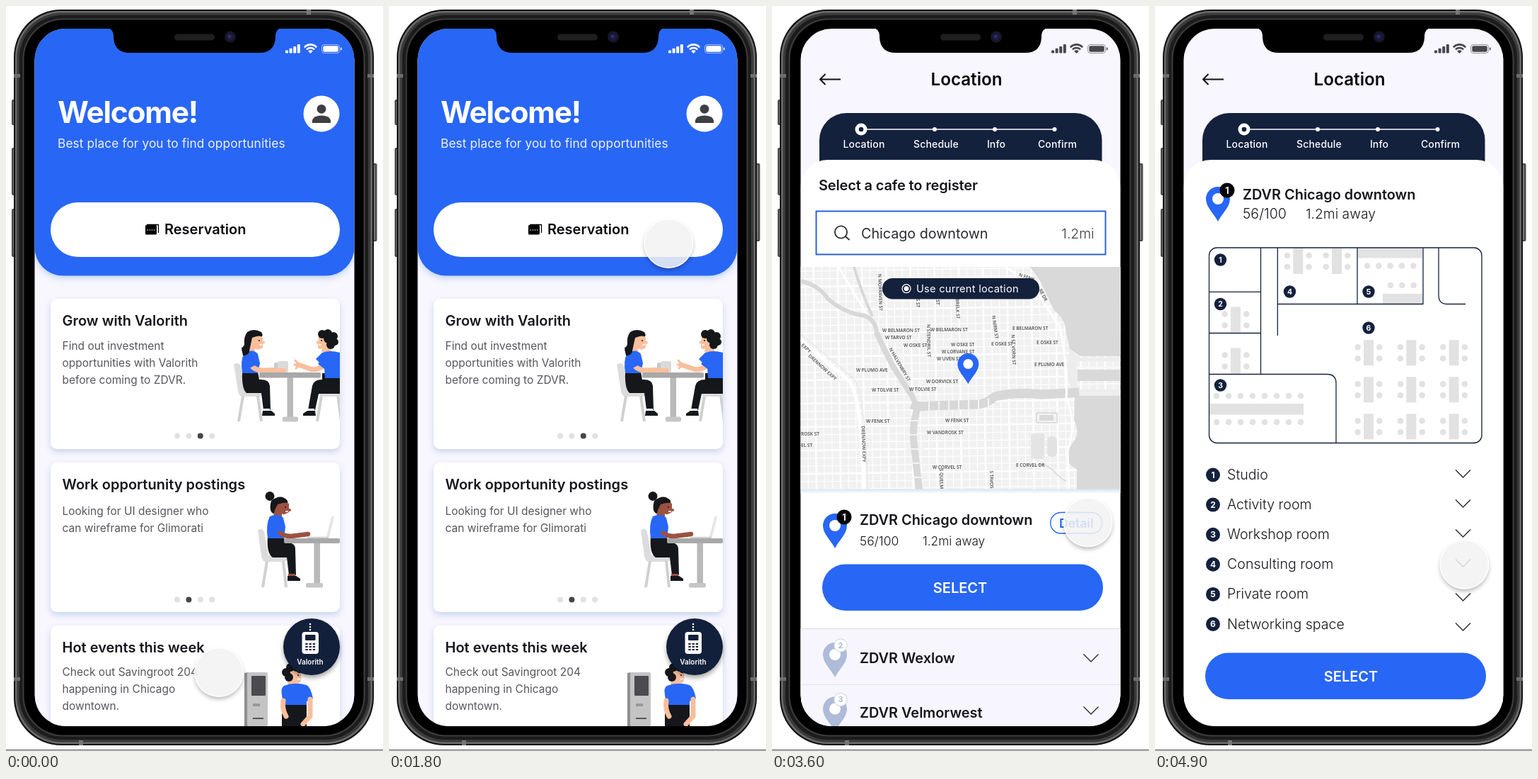
Animation, 533 px wide and 1051 px high, one loop 5 s. Source, as an HTML page with a canvas:

```html
<!DOCTYPE html>
<html lang="en">
<head>
<meta charset="utf-8">
<title>Reservation app</title>
<style>
html, body { margin: 0; width: 100%; height: 100%; overflow: hidden; background: #fff; }
canvas { display: block; width: 533px; height: 1051px; }
</style>
</head>
<body>
<canvas id="stage"></canvas>
<script>
const W = 533, H = 1051, LOOP = 5000, STEP = 100;
const BLUE = '#2866f6', NAVY = '#14213d', PALE = '#f8f6ff', SKIN = '#f9bf9c', BROWN = '#9c5141';
const INK = '#16171b', CHAIR = '#dcdcdc', STEEL = '#a8a8a8', GREY = '#e2e2e2', INACTIVE = '#aebbd9';
const dpr = window.devicePixelRatio || 1;
let g;

function surface(canvas) {
  canvas.width = W * dpr;
  canvas.height = H * dpr;
  const c = canvas.getContext('2d');
  c.scale(dpr, dpr);
  return c;
}

// Drawing helpers
function fill(d, color) { g.fillStyle = color; g.fill(new Path2D(d)); }
function line(d, color, width = 1, cap = 'butt') {
  g.strokeStyle = color; g.lineWidth = width; g.lineCap = cap; g.lineJoin = 'round';
  g.stroke(new Path2D(d));
}
function box(x, y, w, h, color, r = 0) {
  g.fillStyle = color; g.beginPath(); g.roundRect(x, y, w, h, r); g.fill();
}
function frame(x, y, w, h, r, color, width) {
  g.strokeStyle = color; g.lineWidth = width; g.beginPath(); g.roundRect(x, y, w, h, r); g.stroke();
}
function dot(x, y, r, color) {
  g.fillStyle = color; g.beginPath(); g.arc(x, y, r, 0, 7); g.fill();
}
function ring(x, y, r, color, width) {
  g.strokeStyle = color; g.lineWidth = width; g.beginPath(); g.arc(x, y, r, 0, 7); g.stroke();
}
function shade(color, blur, dy) { g.shadowColor = color; g.shadowBlur = blur * dpr; g.shadowOffsetY = dy * dpr; }
function flat() { g.shadowColor = 'transparent'; }
function text(s, x, y, size, weight, color, align = 'left', gap = 0) {
  g.font = `${weight} ${size}px Inter, "Liberation Sans", sans-serif`;
  g.letterSpacing = gap + 'px';
  g.textAlign = align; g.textBaseline = 'alphabetic'; g.fillStyle = color;
  g.fillText(s, x, y);
  g.letterSpacing = '0px';
}

// Phone shell
function phone() {
  box(0, 0, W, H, '#fff');
  box(0, 1049, W, 1.3, '#55555a');
  for (const [x, y, h] of [[8, 132, 36], [8, 200, 67], [8, 286, 68], [518, 222, 110]]) {
    box(x, y, 6.5, h, '#4a4a4a', 2);
    box(x + 2, y + 2, 2, h - 4, '#777', 1);
  }
  const layers = [[0, '#111'], [2, '#6a6a6a'], [4.5, '#3a3a3a'], [8, '#1c1c1c'], [12.5, '#3c3c3c'], [14.5, '#000']];
  for (const [i, c] of layers) box(11 + i, 5 + i, 509 - 2 * i, 1038 - 2 * i, c, 67 - i * .8);
  for (const y of [96, 947]) { box(11, y, 9, 5, '#6d6d6d'); box(511, y, 9, 5, '#6d6d6d'); }
  box(425, 5, 6, 7, '#777');
  box(103, 1036, 6, 7, '#777');
}

function notch() {
  fill('M143 31H390Q382 32 381 41V44Q380 66 358 66H175Q153 66 152 44V41Q151 32 143 31Z', '#000');
  box(238, 39.5, 57, 9, '#1f1f20', 4.5);
  dot(317, 43.5, 8, '#171722');
  dot(317, 43.5, 5, '#1b1b45');
  dot(316, 43, 2.2, '#30307a');
}

function statusBar(color) {
  for (let i = 0; i < 4; i++) box(395 + i * 5.6, 62.5 - i * 2.8, 4, 4 + i * 2.8, color, 1);
  g.save();
  g.beginPath(); g.moveTo(430.5, 67); g.lineTo(418, 54.5); g.lineTo(418, 50); g.lineTo(443, 50); g.lineTo(443, 54.5); g.clip();
  dot(430.5, 66, 3.8, color);
  ring(430.5, 66, 7.1, color, 2.5);
  ring(430.5, 66, 11.6, color, 2.6);
  g.restore();
  g.globalAlpha = .55;
  frame(446.5, 54.5, 25, 12, 3.5, color, 1);
  g.globalAlpha = 1;
  box(448.3, 56.3, 21.4, 8.4, color, 2);
  box(473, 58.5, 1.5, 4, color, 1);
}

function screen(draw, tint) {
  const canvas = document.createElement('canvas');
  g = surface(canvas);
  phone();
  g.save();
  g.beginPath(); g.roundRect(40.5, 32, 452, 984, 44); g.clip();
  draw();
  statusBar(tint);
  g.restore();
  notch();
  return canvas;
}

// Home
function card(y, h, title, lines, first, active) {
  shade('rgba(80,130,190,.28)', 9, 4);
  box(63, y, 409, h, '#fff', 9);
  flat();
  text(title, 79.5, y + 37.7, 20, 600, INK);
  lines.forEach((s, i) => text(s, 79.5, first + i * 24, 15.5, 400, '#56575c'));
  if (active >= 0) for (let i = 0; i < 4; i++)
    dot(242 + i * 16.4, y + 193.5, 4, i === active ? '#45454a' : '#e2e2e2');
}

function meeting() {
  // left chair and sitter
  fill('M322 506Q328 501 332 508L337 543H362Q366 550 358 551H333Q329 549 328 543Z', CHAIR);
  line('M335 550L329 586M356 550L361 586', '#d0d0d0', 4);
  fill('M334 516H356L358 527Q372 526 373 536L374 570H364L361 546H340Q333 540 334 516Z', INK);
  box(364, 568, 9, 4, '#fff');
  fill('M363 571H375L380 575V578H362Z', INK);
  fill('M341 460Q350 454 361 460Q365 466 359 468L350 484Q347 492 337 492Q330 486 337 478Q336 466 341 460Z', INK);
  fill('M348 468Q360 463 363 468V482Q356 487 352 483V491H343Z', SKIN);
  dot(364, 474.5, 2, SKIN);
  dot(358, 472, 1, INK);
  line('M358 478L362 478', '#fff', 1.5);
  fill('M337 489Q350 483 356 491L359 504L356 518H334Q331 500 337 489Z', BLUE);
  line('M346 505Q350 514 364 514L391 513', SKIN, 7, 'round');
  fill('M337 493Q348 490 352 507L342 512Z', BLUE);
  fill('M333 482Q344 478 344 488Q341 494 335 493Z', INK);
  // right chair and sitter
  line('M446 550L440 586M469 548L474 586', '#d0d0d0', 4);
  fill('M441 543H467L470 520L476 514V551H444Z', CHAIR);
  fill('M447 518H472V547H442L437 570H427L433 536Q435 527 447 527Z', INK);
  box(427, 568, 9, 4, '#fff');
  fill('M437 571H426L420 575V578H438Z', INK);
  fill('M442 466Q452 462 455 468L460 488H446L447 483Q441 486 441 480Z', SKIN);
  dot(440.5, 474.5, 2, SKIN);
  dot(446, 472, 1, INK);
  line('M442 478L446 478', '#fff', 1.5);
  for (const [x, y, r] of [[447, 463, 6], [455, 462, 6], [463, 466, 6], [465, 474, 5], [459, 478, 6], [456, 469, 7]]) dot(x, y, r, INK);
  fill('M447 489Q458 485 472 489V525H451L450 510L438 498Z', BLUE);
  line('M450 507Q437 516 428 511L413 506', SKIN, 7, 'round');
  line('M413 505L409 500M413 507L408 506M414 508L410 511', SKIN, 3, 'round');
  fill('M449 495Q461 491 460 506L453 514L441 505Z', BLUE);
  // table
  box(379, 503, 6, 9, '#c9c9c9', 2);
  box(384, 501, 15, 16, '#dadada', 2);
  line('M380 514H393', SKIN, 6, 'round');
  box(397.5, 524, 8.5, 57, '#b9b9b9');
  box(391, 579.5, 22, 7, '#c6c6c6', 2);
  box(358, 517, 87, 7.5, STEEL, 2);
}

function working() {
  fill('M356 740Q361 734 365 742L371 775H396Q401 781 394 784H367Q362 783 361 776Z', CHAIR);
  line('M369 783L363 820M392 783L396 820', '#d0d0d0', 4);
  fill('M370 748H393L394 757Q409 756 409 766L410 803H400L397 778H377Q368 772 370 748Z', INK);
  box(399, 801, 10, 4, BROWN);
  fill('M398 804H410L416 808V811H398Z', INK);
  dot(373, 691.5, 6.5, INK);
  fill('M375 698Q389 687 398 698Q400 705 390 706L382 717Q370 716 375 698Z', INK);
  fill('M384 703Q397 699 400 702V714Q392 719 390 716V724H377L380 711Z', BROWN);
  dot(401, 711, 2, BROWN);
  dot(395, 707, 1, INK);
  line('M395 713H399', '#fff', 1.4);
  fill('M373 720Q385 715 392 722L395 735L393 751H370Q367 731 373 720Z', BLUE);
  line('M384 739Q389 748 403 748L427 745', BROWN, 6.5, 'round');
  fill('M374 724Q386 722 389 740L378 745Z', BLUE);
  fill('M453 749L460 721Q461 719 464 720L457 749Z', '#e5e5e5');
  line('M426 750H456', '#cfcfcf', 2.5);
  box(435.5, 758, 8.5, 57, '#b9b9b9');
  box(424, 814, 24, 6.5, '#c6c6c6', 2);
  box(393, 751, 79, 7, STEEL, 2);
}

function kiosk() {
  fill('M337 941L342 940V1016H337Z', '#8f8f8f');
  box(341, 940, 29, 76, '#c4c4c4', 2);
  box(347, 945, 20, 28, '#4b4b50', 1);
  box(349, 984, 10, 4, '#999');
  line('M349 1005H364', '#555', 2);
  fill('M390 982H425V1016H390Z', INK);
  fill('M397 941L412 934Q419 938 417 952Q413 958 410 955V963H399Z', SKIN);
  line('M412 950L416 949', '#fff', 1.4);
  dot(413, 944, 1, INK);
  for (const [x, y, r] of [[396, 940, 6], [402, 933, 6], [411, 933, 6], [400, 947, 6], [415, 937, 4]]) dot(x, y, r, INK);
  fill('M393 959Q408 953 425 958Q431 961 434 977L425 981V986H392L390 972Q388 962 393 959Z', BLUE);
  line('M392 980Q390 992 396 1002', SKIN, 7, 'round');
  line('M430 978V1002L420 1013', SKIN, 7, 'round');
}

function badge() {
  shade('rgba(0,0,0,.35)', 6, 4);
  dot(432, 904, 40, '#13203b');
  flat();
  for (const y of [872, 876, 880]) dot(430, y, 1.3, '#fff');
  box(418.5, 883, 23.5, 31, '#fff', 4);
  box(423, 887, 14.5, 8, '#13203b', 1);
  for (let i = 0; i < 9; i++) box(423.3 + i % 3 * 5.2, 899 + (i / 3 | 0) * 4, 3.4, 2, '#13203b');
  text('Valorith', 430, 929, 10, 600, '#fff', 'center');
}

function home() {
  box(40, 31, 453, 986, PALE);
  shade('rgba(70,140,220,.35)', 8, 3);
  box(40.5, 20, 452, 360.5, BLUE, [0, 0, 40, 40]);
  flat();
  text('Welcome!', 73, 165, 42.4, 700, '#fff', 'left', -1.25);
  text('Best place for you to find opportunities', 73, 200, 17.3, 400, '#eef2ff', 'left', .1);
  dot(446, 152, 25.5, '#fff');
  dot(446, 145.3, 6.4, '#3d3f45');
  fill('M433 165V161Q435 154.5 446 154.5Q457 154.5 459 161V165Z', '#3d3f45');
  box(63, 277, 409, 77, '#fff', 38.5);
  box(197, 309, 16, 13.5, '#000', 1.5);
  line('M199 308.5H215.5V320', '#000', 1.3);
  for (let i = 0; i < 4; i++) dot(200.3 + i * 3.1, 316, .8, '#fff');
  text('Reservation', 224, 322, 20, 600, '#08090c');

  card(413, 212, 'Grow with Valorith', ['Find out investment', 'opportunities with Valorith', 'before coming to ZDVR.'], 485, 2);
  card(644, 211, 'Work opportunity postings', ['Looking for UI designer who', 'can wireframe for Glimorati'], 718, 1);
  card(874, 212, 'Hot events this week', ['Check out Savingroot 204', 'happening in Chicago', 'downtown.'], 945, -1);
  g.save();
  g.beginPath(); g.rect(63, 413, 409, 620); g.clip();
  meeting();
  working();
  kiosk();
  g.restore();
  badge();
}

// Booking
function pin(x, y, r, color, hole = r * .46) {
  const k = r * 1.88;
  fill(`M${x} ${y + k}C${x - r * .35} ${y + r * 1.2} ${x - r} ${y + r * .7} ${x - r} ${y}A${r} ${r} 0 0 1 ${x + r} ${y}C${x + r} ${y + r * .7} ${x + r * .35} ${y + r * 1.2} ${x} ${y + k}Z`, color);
  dot(x, y, hole, '#fff');
}
function tag(n, x, y, r, color) {
  dot(x, y, r, color);
  text(n, x, y + r * .43, r * 1.2, 700, '#fff', 'center');
}
function chevron(x, y) { line(`M${x - 10.5} ${y - 5.5}L${x} ${y + 5}L${x + 10.5} ${y - 5.5}`, '#222', 1.3); }
function button(y, x) {
  box(71, y, 397, 65.5, BLUE, 32.7);
  text('SELECT', x, y + 40.5, 20, 600, '#fff', 'center');
}

function header() {
  box(40, 31, 453, 986, PALE);
  line('M97 103.5H68M75.5 96L68 103.5L75.5 111', '#111', 2);
  text('Location', 275, 111.5, 24.2, 600, '#08090c', 'center');
  box(67, 151, 399.5, 90, NAVY, [38, 38, 0, 0]);
  line('M126 174H400', '#fff', 1.6);
  dot(126, 174, 8.5, '#fff');
  dot(126, 174, 3.3, NAVY);
  for (const x of [230, 315, 399.5]) dot(x, 174, 3, '#fff');
  [['Location', 130], ['Schedule', 232], ['Info', 317], ['Confirm', 403.5]]
    .forEach(([s, x]) => text(s, x, 200, 14, 500, '#fff', 'center', .15));
  box(40.5, 217, 452, 800, '#fff', [38, 38, 0, 0]);
}

function cafe(y, gap) {
  pin(89, y, 17, BLUE, 8);
  tag('1', 102, y - 12, 10.5, '#000');
  text('ZDVR Chicago downtown', 124, y + gap, 19.9, 600, INK);
}

function label(s, x, y, angle, align = 'center') {
  g.save();
  g.translate(x, y);
  g.rotate(angle * Math.PI / 180);
  g.font = '600 6.5px "Open Sans", "Noto Sans", sans-serif';
  g.textAlign = align; g.textBaseline = 'middle'; g.fillStyle = '#4a4a4a';
  g.fillText(s, 0, 0);
  g.restore();
}

function cityMap() {
  g.save();
  g.beginPath(); g.rect(40, 368, 453, 314); g.clip();
  box(40, 368, 453, 314, '#f1f1f1');
  g.save();
  g.translate(266, 525);
  g.rotate(-.014);
  for (let i = -22; i <= 22; i++)
    line(`M${i * 11.4} -170V170`, '#fff', i % 3 ? 1.1 : 2.4);
  for (let i = -15; i <= 15; i++)
    line(`M-240 ${i * 11}H240`, '#fff', i % 3 ? 1.1 : 2.4);
  g.restore();
  line('M40 470L110 530Q128 560 129 682', '#fff', 5);
  line('M40 462L116 526Q133 552 135 682', '#e6e6e6', 1.2);
  line('M94 368L185 520', '#fff', 3);
  // lake and river
  fill('M364 368Q376 381 383 396L399 430Q415 441 416 462L421 484L436 494H493V368Z', '#d9d9d9');
  fill('M428 550H493V682H431V654Q407 640 424 618Q437 604 427 584Z', '#d9d9d9');
  fill('M421 484L436 496H493V501H432V541H493V550H428L415 520Z', '#ededed');
  line('M432 521H493', '#d9d9d9', 16);
  line('M430 510H493', '#f7f7f7', 3);
  line('M40 388Q65 393 80 414Q104 434 132 437Q148 445 148 463', '#d8d8d8', 6);
  line('M148 461Q158 483 171 508L199 552L205 566', '#d8d8d8', 8);
  line('M116 368Q126 403 142 438', '#d8d8d8', 4);
  line('M197 562Q207 566 224 564L292 562Q305 560 315 551Q344 544 380 548L434 545', '#d8d8d8', 13);
  line('M207 563Q197 592 201 620L208 682', '#d8d8d8', 10);
  for (let i = 0; i < 7; i++) line(`M${222 + i * 14} 553V572`, '#f4f4f4', 2);
  for (let i = 0; i < 5; i++) line(`M190 ${585 + i * 20}H216`, '#f4f4f4', 2);
  line('M330 368L370 394Q386 424 407 452Q419 514 416 552Q431 590 418 628L420 682', '#fff', 3);
  // parks and piers
  box(366, 603, 19, 36, '#e4e4e4', 3);
  box(389, 607, 14, 29, '#e2e2e2', 6);
  frame(374, 574, 29, 14, 1, '#d6d6d6', 1.5);
  box(378, 577, 20, 8, '#dadada');
  line('M366 652Q382 640 397 655T416 670', '#dedede', 2);

  const across = [
    ['W BELMARON ST', 156, 458], ['W BELMARON ST', 224, 457], ['W TARVO ST', 160, 468.5],
    ['W OSKE ST', 186, 479], ['W OSKE ST', 253, 478], ['W LORVANE ST', 240, 488.5], ['W UVEN ST', 233, 498.5],
    ['W PLUMO AVE', 119, 514], ['W DORVICK ST', 218, 530.5], ['W TOLVIE ST', 141, 542], ['W TOLVIE ST', 194, 541.5],
    ['W FENK ST', 133, 586], ['W FENK ST', 245, 585.5], ['W VANDROSK ST', 219, 602], ['W CORVEL ST', 227, 651.5],
    ['E BELMARON ST', 340, 455], ['E OSKE ST', 310, 477], ['E OSKE ST', 374, 475], ['E PLUMO AVE', 371, 506.5],
    ['E CORVEL DR', 345, 648.5], ['ROSK ST', 41, 604], ['EL ST', 41, 620.5]
  ];
  for (const [s, x, y] of across) label(s, x, y, 0, 'left');
  const turned = [
    ['N MORRAVEN ST', 152.5, 404, 88], ['S ST', 206, 419, 90], ['ST', 234, 418, 90], ['BRELK ST', 262, 427, 88],
    ['N STENDRIL ST', 221, 472, 89], ['N NIRM ST', 315, 453, 82], ['N ST VORN ST', 341, 485, 88],
    ['N HALVENBRY ST', 180, 506, 60], ['DRENNOW EXPY', 71, 510, 42], ['EXPY', 48, 483, 42],
    ['DRENNOW EXPY', 129, 618, 88], ['S QUELM', 239, 667, 89], ['S TAVOS', 310, 668, 89],
    ['N FENK', 360, 383, 18], ['RE DR', 383, 408, 62]
  ];
  for (const [s, x, y, a] of turned) label(s, x, y, a);
  g.restore();
  const edge = g.createLinearGradient(0, 681, 0, 688);
  edge.addColorStop(0, '#d4e2f3');
  edge.addColorStop(1, '#fff');
  box(40, 681.5, 453, 6, edge);
}

function cafeRow(name, n, y) {
  pin(89, y, 17, INACTIVE, 8);
  dot(97, y - 13, 9.2, '#fff');
  ring(97, y - 13, 9.2, '#c8d0e2', 1);
  text(n, 97, y - 9.2, 10.5, 600, '#a3b0ce', 'center');
  text(name, 124, y + 12, 19.9, 600, INK);
}

function cafeList() {
  header();
  text('Select a cafe to register', 66, 260, 20, 600, INK, 'left', -.15);
  frame(62.5, 289.5, 409, 61, 0, '#2b62d3', 2);
  ring(97.5, 319, 8.6, '#333', 1.9);
  line('M103.8 325.3L109.5 330', '#333', 2);
  text('Chicago downtown', 126, 327.5, 19.7, 400, '#2a2b30');
  text('1.2mi', 455.5, 327.5, 19.3, 300, '#3c3d42', 'right');
  cityMap();
  box(156, 384, 222, 29.5, NAVY, 14.7);
  ring(190, 398.7, 6, '#fff', 1.3);
  dot(190, 398.7, 3.4, '#fff');
  text('Use current location', 204, 403.7, 14.6, 400, '#fff', 'left', .25);
  pin(277.3, 505, 15, BLUE, 7);
  cafe(733, -1);
  text('56/100', 124, 761, 17.5, 300, INK);
  text('1.2mi away', 213, 761, 17.2, 300, INK);
  frame(393.7, 714.5, 73, 29.5, 14.7, BLUE, 1.4);
  text('Detail', 430.3, 735.5, 17.5, 600, BLUE, 'center');
  button(787.5, 266);
  box(40, 878, 453, 140, '#f7f6fe');
  box(40, 878, 453, 1, '#dcdce2');
  box(40, 957, 453, 1, '#e4e3ec');
  cafeRow('ZDVR Wexlow', '2', 915);
  cafeRow('ZDVR Velmorwest', '3', 991.5);
  chevron(451, 920);
  chevron(451, 994);
}

// Floor plan
function seats(x, y, n, pitch) {
  for (let i = 0; i < n; i++) dot(x + i * pitch, y, 4.3, GREY);
}
function desk(x, y, h = 36) {
  box(x - 7, y - h / 2, 14, h, GREY);
  for (const dy of [-8, 8]) seats(x - 15.3, y + dy, 2, 30.6);
}

function plan() {
  header();
  cafe(272, .5);
  text('56/100', 124, 300, 19.6, 300, INK);
  text('1.2mi away', 213, 300, 19.3, 300, INK);

  desk(114, 442.5);
  desk(114, 500.5);
  desk(202.3, 360);
  desk(257, 360);
  box(287, 342, 91, 13.5, GREY);
  seats(300, 366.5, 5, 16.3);
  seats(333, 394, 3, 16.3);
  box(322, 406, 56, 14, GREY);
  seats(87, 550, 8, 17);
  box(77, 561, 133, 15.5, GREY);
  seats(87, 587, 8, 17);
  for (let i = 0; i < 9; i++) desk(302 + i % 3 * 60.3, 489.3 + (i / 3 | 0) * 52);
  frame(76.5, 341, 385.5, 275.5, 11, NAVY, 1.3);
  line('M149.5 341V519.5M76.5 403.3H149.5M76.5 461.5H149.5M76.5 519.5H243Q256 519.5 256 532V616.5', NAVY, 1.3);
  line('M173.3 341V465M173.3 420.5H379V341M286 341V420.5M401 341V408Q401 420.5 413 420.5H439', NAVY, 1.3);
  [[92.5, 358], [92.5, 420.5], [92.5, 535], [190.5, 403], [302, 403], [302, 454]]
    .forEach(([x, y], i) => tag(i + 1, x, y, 8.7, NAVY));

  ['Studio', 'Activity room', 'Workshop room', 'Consulting room', 'Private room', 'Networking space'].forEach((s, i) => {
    const y = 661 + i * 42.1;
    tag(i + 1, 82, y + .5, 10, NAVY);
    text(s, 102, y + 7, 19.6, 300, INK);
    chevron(435.5, 660 + i * 42 + (i > 3 ? 6 : 0));
  });
  button(912.5, 277);
}

// Touch pointer
const ease = u => u * u * (3 - 2 * u);
function track(t, start, moves) {
  return moves.reduce((v, [a, b, to]) => v + (to - v) * ease(Math.min(1, Math.max(0, (t - a) / (b - a)))), start);
}
function pointer(t) {
  const x = track(t, 301, [[0, 600, 395.3], [2400, 2900, 532], [2900, 3000, 446.7], [4200, 4800, 437.5]]);
  const y = track(t, 940, [[0, 796, 335], [2400, 2900, 788], [2900, 3000, 728.5], [4200, 4800, 788]]);
  g.save();
  // keep the shadow outside the translucent disc
  g.beginPath(); g.rect(0, 0, W, H); g.arc(x, y, 34.5, 0, 7); g.clip('evenodd');
  shade('rgba(0,0,0,.3)', 6, 3.5);
  dot(x, y, 34, '#ddd');
  g.restore();
  dot(x, y, 34.5, 'rgba(243,243,243,.86)');
  ring(x, y, 34.2, 'rgba(255,255,255,.95)', 1.5);
}

const screens = [
  [0, screen(home, '#fff')],
  [1900, screen(cafeList, '#47474c')],
  [3700, screen(plan, '#47474c')]
];
const stage = surface(document.getElementById('stage'));
const began = performance.now();

function tick() {
  const elapsed = (performance.now() - began) % LOOP;
  const t = Math.floor(elapsed / STEP) * STEP;
  const current = screens.filter(([from]) => t >= from).pop()[1];
  g = stage;
  g.drawImage(current, 0, 0, W, H);
  pointer(t);
  requestAnimationFrame(tick);
}
tick();
</script>
</body>
</html>
```
